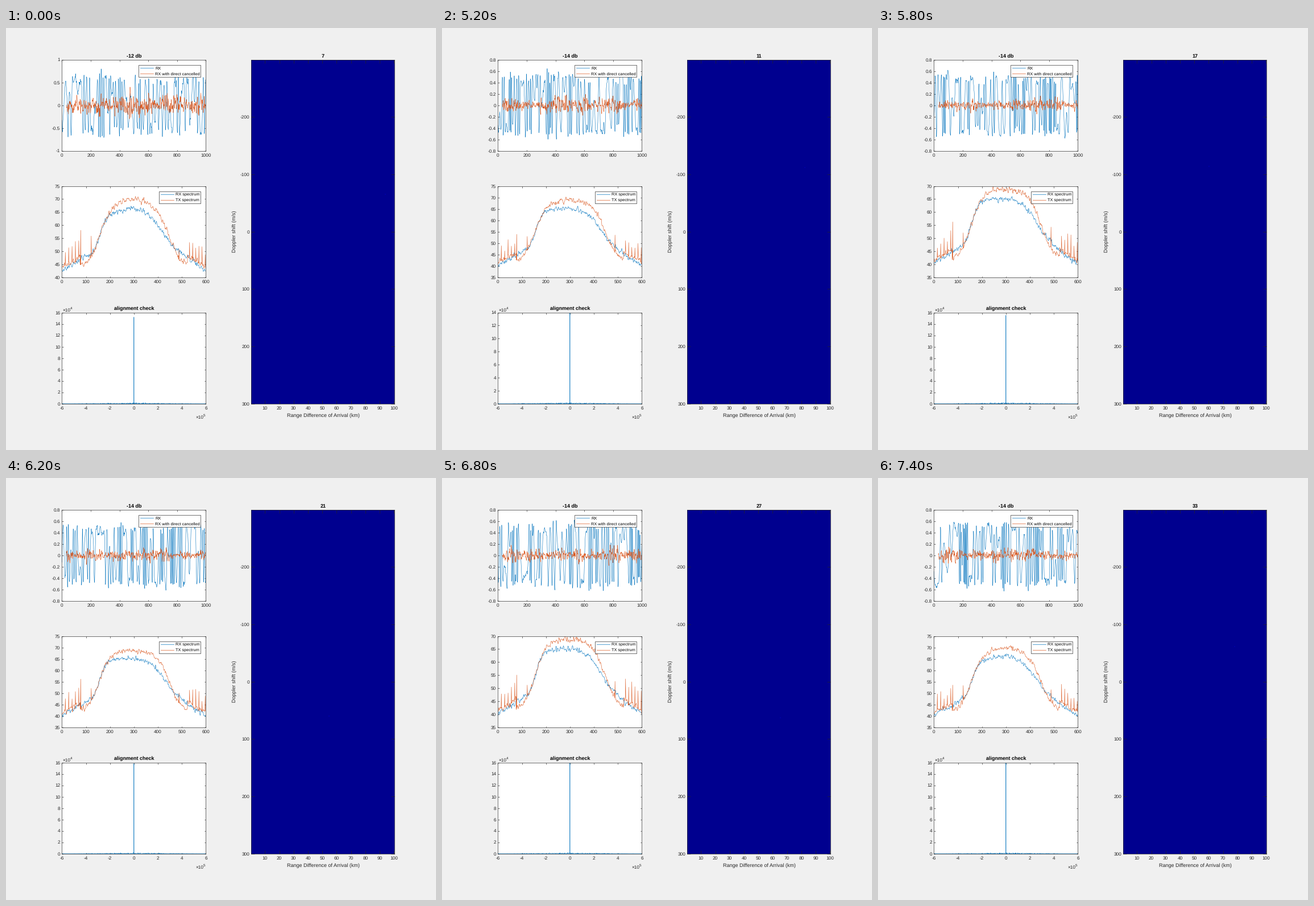
A matplotlib script that plays this animation: 756x741 px, repeating every 7.6 s.

```python
import numpy as np
import matplotlib.pyplot as plt
from matplotlib.animation import FuncAnimation
from matplotlib.patches import Rectangle

W, H, DPI = 756, 741, 72          # at 72 dpi one point is one pixel
BLUE, ORANGE, INK, NAVY = "#0072BD", "#D95319", "#262626", "#00008f"
TICK, LABEL, SMALL = 8.2, 8.96, 7.33
FRAME_LW, DATA_LW = 0.65, 0.55
HOLD, STEPS = 25, 14              # frames of the first reading, readings

plt.rcParams.update({"font.family": "Liberation Sans", "font.size": TICK,
                     "text.color": INK, "axes.unicode_minus": False,
                     "text.hinting": "none"})

fig = plt.figure(figsize=(W / DPI, H / DPI), dpi=DPI, facecolor="#f0f0f0")


def panel(x0, y0, x1, y1, tick=2.5, color="white"):
    """Axes whose border falls on the given pixel columns and rows."""
    ax = fig.add_axes([(x0 + 0.4) / W, 1 - (y1 + 0.6) / H,
                       (x1 - x0) / W, (y1 - y0) / H], facecolor=color)
    ax.tick_params(direction="in", top=True, right=True, length=tick,
                   width=FRAME_LW, color=INK, labelcolor=INK, labelsize=TICK)
    ax.tick_params(axis="x", pad=5)
    ax.tick_params(axis="y", pad=3.2)
    for spine in ax.spines.values():
        spine.set(linewidth=FRAME_LW, color=INK)
    return ax


def set_ticks(axis, values):
    axis.set_ticks(values, [f"{v:g}" for v in values])


def trace(ax, color):
    return ax.plot([], [], color=color, lw=DATA_LW)[0]


rx_ax = panel(98, 55, 351, 215)
spec_ax = panel(98, 277, 351, 437)
align_ax = panel(98, 499, 351, 659)
map_ax = panel(431, 55, 683, 659, 6, NAVY)

rx_ax.set_xlim(0, 1000)
set_ticks(rx_ax.xaxis, range(0, 1001, 200))
spec_ax.set_xlim(0, 600)
set_ticks(spec_ax.xaxis, range(0, 601, 100))
align_ax.set_xlim(-6, 6)
set_ticks(align_ax.xaxis, range(-6, 7, 2))
map_ax.set(xlim=(0.5, 100.5), ylim=(300, -300))
set_ticks(map_ax.xaxis, range(10, 101, 10))
set_ticks(map_ax.yaxis, range(-200, 301, 100))

rx_line, residual_line = trace(rx_ax, BLUE), trace(rx_ax, ORANGE)
rx_spec, tx_spec = trace(spec_ax, BLUE), trace(spec_ax, ORANGE)
align_line = trace(align_ax, BLUE)
echo = map_ax.scatter([0], [0], s=3, marker="s", linewidths=0)

# overlay in pixel coordinates for captions and legends
page = fig.add_axes([0, 0, 1, 1])
page.set(xlim=(0, W), ylim=(H, 0))
page.axis("off")


def title(x, y, text=""):
    return page.text(x, y, text, size=LABEL, weight="bold", color="black",
                     ha="center", va="baseline")


def power(x, y, exponent):
    page.text(x, y, "×10", size=TICK)
    return page.text(x + 14, y - 3.5, exponent, size=6.4)


def legend(x, y, width, names):
    page.add_patch(Rectangle((x, y), width, 21, fc="white", ec=INK,
                             lw=FRAME_LW))
    for i, (name, color) in enumerate(zip(names, (BLUE, ORANGE))):
        row = y + 5.5 + 10 * i
        page.plot([x + 2.5, x + 26], [row, row], color=color, lw=FRAME_LW)
        page.text(x + 28.7, row + 2.7, name, size=SMALL, color="black")


gain_title = title(225, 51.5)
count_title = title(557.5, 51.5)
title(225, 495.5, "alignment check")
page.text(557.5, 683.3, "Range Difference of Arrival (km)", size=LABEL,
          ha="center")
page.text(406.5, 357.5, "Doppler shift (m/s)", size=LABEL, rotation=90,
          ha="right", va="center")
align_power = power(99, 498, "4")
power(333, 685.5, "5")
legend(233.4, 64.6, 109, ("RX", "RX with direct cancelled"))
legend(269.4, 286.6, 73, ("RX spectrum", "TX spectrum"))


def smooth_noise(rng, n, width):
    t = np.arange(-3 * width, 3 * width + 1)
    raw = rng.normal(size=n + 6 * width)
    out = np.convolve(raw, np.exp(-0.5 * (t / width) ** 2), "valid")
    return out / out.std()


def hump(x, left, left_width, right, right_width):
    """Plateau from 0 to 1 with a soft edge on each side."""
    return 1 / ((1 + np.exp((left - x) / left_width))
                * (1 + np.exp((x - right) / right_width)))


def draw_rx(rng, step):
    limit = 1.0 if step < 2 else 0.6 if step % 8 == 4 else 0.8
    residual = 0.05 + 0.045 * np.exp(-step / 1.5)
    n = np.arange(1000)
    # frequency modulated carrier, faster when it is quieter
    phase = 2 * np.pi * np.cumsum(0.045 / limit * smooth_noise(rng, 1000, 9))
    envelope = (0.2 + 0.37 * limit) * (1 + 0.1 * smooth_noise(rng, 1000, 6))
    signal = envelope * np.cos(phase + 2.2)
    rx_line.set_data(n, signal + 0.5 * residual * smooth_noise(rng, 1000, 1))
    swell = 0.9 + 0.2 * smooth_noise(rng, 1000, 25)
    left = residual * swell * smooth_noise(rng, 1000, 1)
    residual_line.set_data(n[30:], left[30:])
    rx_ax.set_ylim(-limit, limit)
    unit = 0.5 if limit == 1 else 0.2
    count = round(limit / unit)
    set_ticks(rx_ax.yaxis, [k * unit for k in range(-count, count + 1)])


def draw_spectra(rng, step):
    x = np.arange(601)
    edge = np.minimum(x, 600 - x)
    peaked = step == 0 or step > 10
    bump = (2 if peaked else 0.4) * np.clip(edge / 90 - 7 / 3, 0, None)
    lift = 2.3 * np.clip((180 - edge) / 100, 0, 1) if step == 0 else 0
    rx = 40.3 + 0.055 * np.minimum(edge, 110) + 18.5 * hump(x, 158, 14, 430, 30)
    tx = 41.5 + np.where(edge < 77, 0.045 * edge, 0) + 27 * hump(x, 155, 23, 447, 26)
    rx = rx + bump + lift + 0.5 * smooth_noise(rng, 601, 1)
    tx = tx + bump + lift + 0.55 * smooth_noise(rng, 601, 1)
    for carrier in [*range(14, 78, 14), 78, 122, 488, *range(532, 600, 13)]:
        tx[carrier] += rng.uniform(4, 8) + (6 if carrier == 78 else 0)
    rx_spec.set_data(x, rx)
    tx_spec.set_data(x, tx)
    bottom = 40 if step == 0 else 35
    top = 70 if 4 < step < 11 and step % 4 in (1, 2) else 75
    spec_ax.set_ylim(bottom, top)
    set_ticks(spec_ax.yaxis, range(bottom, top + 1, 5))


def draw_alignment(rng, step):
    # the spike drops once, then recovers towards 16e4
    spike = 16 - 3.3 * 0.62 ** (step - 1) if step else 15.2
    wide = step == 11
    top = 20 if wide else 14 if spike < 14 else 16
    scale = 10 if wide else 1
    x = np.linspace(-6, 6, 1201)
    y = 0.055 * np.abs(rng.normal(size=1201)) * (1 - np.abs(x) / 6)
    y[600] = spike
    align_line.set_data(x, y / scale)
    align_ax.set_ylim(0, top / scale)
    set_ticks(align_ax.yaxis,
              [k / 2 for k in range(5)] if wide else range(0, top + 1, 2))
    align_power.set_text("5" if wide else "4")


def draw_echo(rng, step):
    strong = step == 8
    place = (20, 0) if strong else (rng.uniform(40, 97), rng.uniform(-260, 100))
    echo.set_offsets([place])
    echo.set_facecolor("#1040ff" if strong else "#0000a4")


def update(frame):
    step = max(0, frame - HOLD + 1)
    rng = np.random.default_rng(70 + step)
    gain_title.set_text("-14 db" if step else "-12 db")
    count_title.set_text(str(7 + 2 * step))
    for draw in (draw_rx, draw_spectra, draw_alignment, draw_echo):
        draw(rng, step)
    return []


anim = FuncAnimation(fig, update, frames=HOLD + STEPS - 1, interval=200,
                     repeat=True, repeat_delay=0, blit=False)
plt.show()
```
